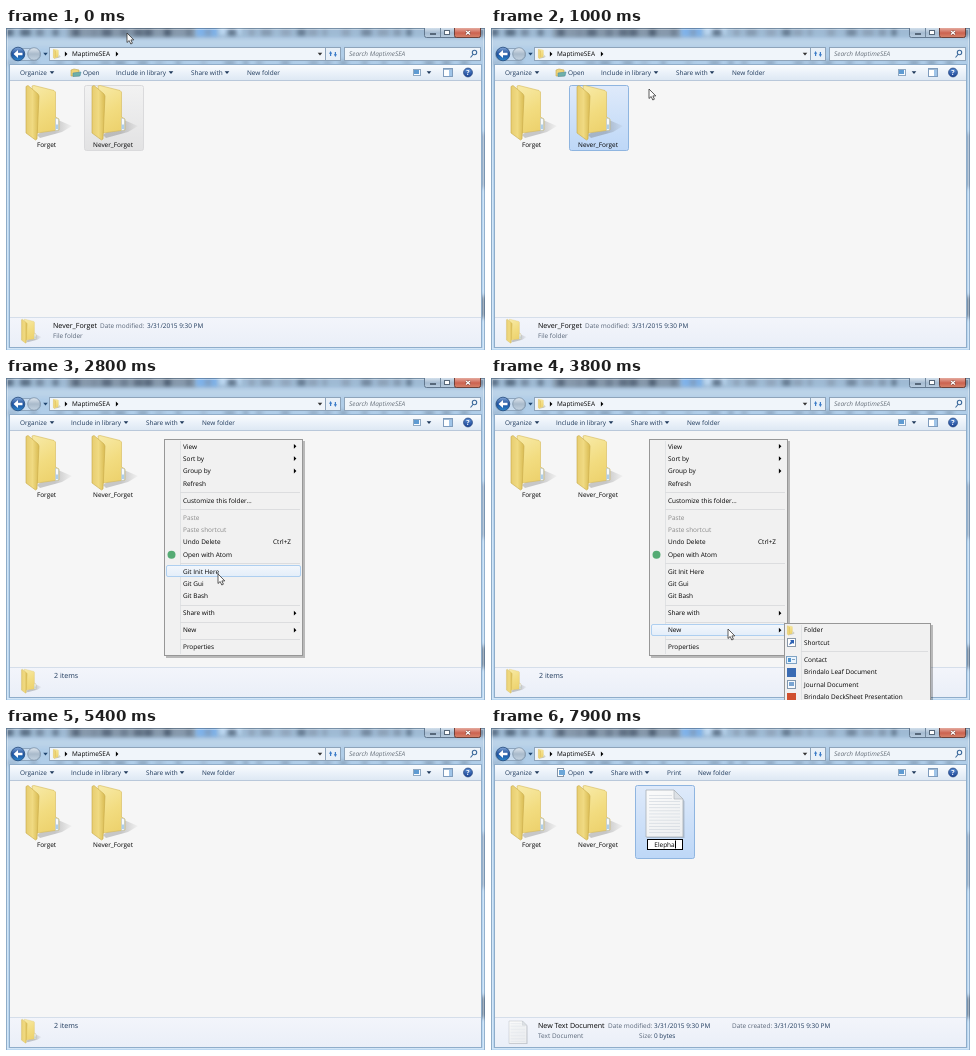
Animation, 479 px wide and 322 px high, one loop 8000 ms. Source, as an HTML page with a canvas:

```html
<!DOCTYPE html>
<html lang="en">
<head>
<meta charset="utf-8">
<title>Folder window</title>
<style>
html, body { margin: 0; width: 479px; height: 322px; overflow: hidden; }
canvas { display: block; }
</style>
</head>
<body>
<canvas id="stage" width="479" height="322"></canvas>
<script>
const W = 479, H = 322, LOOP = 8000;
const FACE = '"Open Sans", "Noto Sans", sans-serif';
const INK = '#000', NAVY = '#1e395b', DIM = '#5a6779';
const stage = document.getElementById('stage');
let c = stage.getContext('2d');

function fade(x0, y0, x1, y1, ...stops) {
  const g = c.createLinearGradient(x0, y0, x1, y1);
  stops.forEach((s, i) => g.addColorStop(i / (stops.length - 1), s));
  return g;
}
function box(x, y, w, h, fill, line) {
  if (fill) { c.fillStyle = fill; c.fillRect(x, y, w, h); }
  if (line) { c.strokeStyle = line; c.lineWidth = 1; c.strokeRect(x + .5, y + .5, w - 1, h - 1); }
}
function round(x, y, w, h, r, fill, line) {
  c.beginPath();
  c.roundRect(x + .5, y + .5, w - 1, h - 1, r);
  c.fillStyle = fill; c.fill();
  c.lineWidth = 1; c.strokeStyle = line; c.stroke();
}
function poly(pts, fill, line, width = .6) {
  c.beginPath();
  for (let i = 0; i < pts.length; i += 2) c.lineTo(pts[i], pts[i + 1]);
  c.closePath();
  if (fill) { c.fillStyle = fill; c.fill(); }
  if (line) { c.strokeStyle = line; c.lineWidth = width; c.stroke(); }
}
function disc(x, y, r, fill, line) {
  c.beginPath(); c.arc(x, y, r, 0, 7);
  c.fillStyle = fill; c.fill();
  if (line) { c.strokeStyle = line; c.lineWidth = .8; c.stroke(); }
}
function text(s, x, y, color = INK, size = 6.45, align = 'left', style = '') {
  c.font = `${style} ${size}px ${FACE}`;
  c.textAlign = align;
  c.fillStyle = color;
  c.fillText(s, x, y);
}
const down = (x, y, color = NAVY) => poly([x - 2.3, y - 1.2, x + 2.3, y - 1.2, x, y + 1.4], color);
const right = (x, y, color = INK) => poly([x - 1.1, y - 2.4, x + 1.4, y, x - 1.1, y + 2.4], color);

function at(x, y, scale, draw) {
  c.save(); c.translate(x, y); c.scale(scale, scale); draw(); c.restore();
}

// Standing open folder, about 46 by 55 units
function folder(x, y, scale = 1) {
  at(x, y, scale, () => {
    poly([33, 35, 47, 41, 37, 47, 15, 53, 12, 50], fade(14, 0, 47, 0, 'rgba(90,90,90,.3)', 'rgba(90,90,90,.3)', 'rgba(90,90,90,.03)'));
    poly([7, 1, 9, .5, 29, 5.5, 30.5, 7, 30.5, 32, 34, 34, 34, 45, 12, 48], fade(8, 4, 34, 46, '#f7e9a4', '#f2dc80', '#ecd06a'), '#d6b95a');
    poly([30.5, 33, 33.5, 34, 33.5, 45, 30.5, 45.5], '#f8fafc', '#b3bfc9');
    poly([31.4, 39.5, 32.6, 39.5, 32.6, 44, 31.4, 44], '#7eb3df');
    poly([1, 1.5, 3, .5, 13, 9, 14, 11, 12, 54, 10.5, 55, 1, 48], fade(1, 0, 14, 0, '#e7cd70', '#f0da82', '#d9bb52'), '#c8a948');
  });
}

// Ruled sheet with a turned corner, 38 by 47 units
function sheet(x, y, scale = 1) {
  at(x, y, scale, () => {
    poly([1, 1.5, 29, 1.5, 38.5, 11, 38.5, 48, 1, 48], 'rgba(60,70,80,.22)');
    poly([0, 0, 28, 0, 37, 9, 37, 47, 0, 47], fade(0, 0, 37, 47, '#fbfbfb', '#eceef0'), '#a8afb6', .8);
    for (let i = 0; i < 13; i++) box(3, 5 + i * 3.1, i < 2 ? 23 : 31, .7, '#d3d9e0');
    poly([28, 0, 37, 9, 28, 9], '#dde1e6', '#a8afb6');
  });
}

// Blurred desktop seen through the window border
const glass = document.createElement('canvas');
glass.width = W; glass.height = H;
function paintGlass() {
  const main = c;
  c = glass.getContext('2d');
  box(0, 0, W, H, fade(0, 0, 0, H, '#aecbe6', '#b7d5f0', '#bbd8f2'));
  let seed = 11;
  const rnd = () => (seed = seed * 16807 % 2147483647) / 2147483647;
  const blobs = (y, h, gap, alpha) => {
    for (let x = 0; x < W; x += gap * (.6 + rnd() * .8)) {
      const tone = 50 + rnd() * 100;
      box(x, y, 4 + rnd() * 7, h, `rgba(${tone - 15},${tone},${tone + 20},${alpha})`);
    }
  };
  c.filter = 'blur(2px)';
  box(-3, -3, W + 6, 13, '#9fbad4');
  box(62, -3, 128, 13, '#8799ac');
  box(190, -3, 22, 12, '#7fb2ea');
  box(213, -3, 22, 10, '#bcd8f2');
  blobs(1, 7, 17, .6);
  box(0, 11, W, 8, '#bcd3e8');
  blobs(33, 4, 20, .4);
  box(475, 105, 6, 55, '#8ba3bc');
  box(475, 268, 6, 22, '#66788b');
  c.filter = 'none';
  box(0, 0, W, 1, 'rgba(60,80,100,.4)');
  box(0, 0, 1, H, 'rgba(80,110,140,.4)');
  box(W - 1, 0, 1, H, 'rgba(80,110,140,.35)');
  box(1, 1, W - 2, H - 2, null, 'rgba(255,255,255,.35)');
  box(3, 36, 473, 284, null, '#8fadca');
  c = main;
}

function caption() {
  round(418, -3, 57, 13, 2, fade(0, 0, 0, 10, '#d3e0ec', '#a5bbd1', '#bdd0e2'), '#62788f');
  round(448, -3, 27, 13, 2, fade(0, 0, 0, 10, '#e5ab9f', '#cc6250', '#d88a70'), '#6d4038');
  box(434, 0, 1, 9, '#71879d');
  box(424, 5, 6, 2, '#fff', '#57687a');
  box(438, 2, 6, 5, '#fff', '#57687a');
  for (const [color, w] of [['#7a3a30', 2.4], ['#fff', 1.4]]) {
    c.strokeStyle = color; c.lineWidth = w;
    c.beginPath();
    c.moveTo(460, 3); c.lineTo(464, 6.6);
    c.moveTo(464, 3); c.lineTo(460, 6.6);
    c.stroke();
  }
}

function addressBar() {
  round(4, 20, 31, 13, 6, 'rgba(225,236,247,.5)', '#8da5bd');
  disc(12, 26, 6.8, fade(0, 19, 0, 33, '#86a9d8', '#1c4f9c', '#2f8bd0'), '#234a7c');
  poly([7.5, 26, 12, 22, 12, 24.8, 16.5, 24.8, 16.5, 27.2, 12, 27.2, 12, 30], '#fff');
  disc(28, 26, 6.3, fade(0, 19, 0, 33, '#e6edf4', '#a9bacb', '#c6d5e3'), '#7d92a8');
  down(39.5, 26, '#20466f');
  box(43, 19, 277, 14, '#f0f5fa', '#8ea4ba');
  box(319, 19, 16, 14, '#e8f0f8', '#8ea4ba');
  box(338, 19, 137, 14, '#f0f5fa', '#8ea4ba');
  folder(47, 21, .18);
  right(60, 26);
  text('MaptimeSEA', 66, 28.3);
  right(111, 26);
  down(314, 26, '#333');
  poly([323, 25.8, 324.6, 23, 326.2, 25.8, 325.2, 25.8, 325.2, 28, 324, 28, 324, 25.8], '#3c7cc8');
  poly([331, 26.2, 329.4, 29, 327.8, 26.2, 328.8, 26.2, 328.8, 24, 330, 24, 330, 26.2], '#3c7cc8');
  text('Search MaptimeSEA', 343, 28.3, '#69727c', 6.45, 'left', 'italic');
  c.strokeStyle = '#3c6a9c'; c.lineWidth = 1.1;
  c.beginPath(); c.arc(468.5, 24.5, 2.2, 0, 7);
  c.moveTo(467, 26.5); c.lineTo(464.5, 29.5); c.stroke();
}

// Label, its x and, where there is one, the x of its arrow
const BARS = {
  folder: [['Open', 77], ['Include in library', 110, 165], ['Share with', 185, 221], ['New folder', 241]],
  none: [['Include in library', 65, 120], ['Share with', 140, 176], ['New folder', 196]],
  file: [['Open', 77, 100], ['Share with', 120, 156], ['Print', 176], ['New folder', 207]]
};
function toolbar(kind) {
  box(4, 37, 471, 16, fade(0, 37, 0, 53, '#fafcfe', '#eaf1f9', '#dce7f3'));
  box(4, 52, 471, 1, '#b9c8da');
  for (const [label, x, arrow] of [['Organize', 14, 46], ...BARS[kind]]) {
    text(label, x, 46.8, NAVY);
    if (arrow) down(arrow, 44.5);
  }
  if (kind === 'folder') {
    poly([65, 42, 68, 41, 73, 42, 73, 48, 65, 48], '#efd476', '#c3a650');
    poly([67, 45, 75, 44, 74, 48, 67, 48.5], '#6fb0a8', '#4f8fa8');
  } else if (kind === 'file') {
    box(66, 40, 7, 9, '#fff', '#8494a6');
    box(68, 42, 6, 5, '#6ba6d8');
  }
  box(407, 41, 8, 7, '#f8fbff', '#8fa8c2');
  box(408, 42, 5, 4, '#5f9bd2');
  down(423, 44.5);
  box(437, 40, 10, 9, '#fff', '#7f9cbd');
  box(443, 42, 3, 6, '#9fc4e8');
  box(438, 41, 8, 1, '#9fb8d2');
  disc(462, 44.5, 4.4, fade(0, 40, 0, 49, '#5f92d6', '#173f92'), '#1d3f7c');
  text('?', 462, 47.1, '#fff', 7, 'center', 'bold');
}

function details(kind) {
  box(4, 289, 471, 30, fade(0, 289, 0, 319, '#f3f5fb', '#eaeff8'));
  box(4, 289, 471, 1, '#d5deea');
  const when = '3/31/2015 9:30 PM';
  if (kind === 'file') sheet(18, 293, .48);
  else folder(15, 291, .44);
  if (kind === 'none') return text('2 items', 48, 299.8, NAVY, 7.1);
  const file = kind === 'file';
  text(file ? 'New Text Document' : 'Never_Forget', 47, 299.8, INK, 7.1);
  text('Date modified:', file ? 117 : 94, 299.8, DIM);
  text(when, file ? 163 : 141, 299.8, NAVY);
  text(file ? 'Text Document' : 'File folder', 47, 309.8, DIM);
  if (file) {
    text('Date created:', 241, 299.8, DIM);
    text(when, 283, 299.8, NAVY);
    text('Size:', 148, 309.8, DIM);
    text('0 bytes', 163, 309.8, NAVY);
  }
}

const picked = (x, h) => round(x, 57, 60, h, 2, fade(0, 57, 0, 57 + h, '#dfeafa', '#bdd7f7'), '#8fb5e0');

function items(s) {
  box(4, 53, 471, 236, '#f6f6f6');
  if (s.pick === 'idle') round(78, 57, 60, 66, 2, fade(0, 57, 0, 123, '#f2f2f2', '#e2e2e3'), '#dadadc');
  if (s.pick === 'live') picked(78, 66);
  folder(19, 57);
  folder(85, 57);
  text('Forget', 40.5, 119.3, INK, 6.45, 'center');
  text('Never_Forget', 107, 119.3, INK, 6.45, 'center');
  if (s.name === null) return;
  picked(144, 74);
  sheet(155, 62);
  const mid = 173.5;
  c.font = `6.45px ${FACE}`;
  if (s.name === '') {
    box(150, 111, 47, 19, '#fff', INK);
    ['New Text', 'Document'].forEach((word, i) => {
      const w = c.measureText(word).width;
      box(mid - w / 2, 112.5 + i * 8, w, 8, '#3399ff');
      text(word, mid, 118.8 + i * 8, '#fff', 6.45, 'center');
    });
    return;
  }
  const w = c.measureText(s.name).width, bw = Math.round(w + 15.6);
  box(Math.round(mid - bw / 2), 111, bw, 11, '#fff', INK);
  text(s.name, mid, 119.2, INK, 6.45, 'center');
  box(Math.round(mid + w / 2), 112.5, 1, 8, INK);
}

// Centre line, label, extra: '>' opens a submenu, '-' is greyed out
const MENU = [
  [68.3, 'View', '>'], [80.6, 'Sort by', '>'], [93, 'Group by', '>'], [105.3, 'Refresh'],
  [122.3, 'Customize this folder...'], [139.3, 'Paste', '-'], [151.7, 'Paste shortcut', '-'],
  [164, 'Undo Delete', 'Ctrl+Z'], [176.6, 'Open with Atom'], [193.4, 'Git Init Here'],
  [205.7, 'Git Gui'], [218.2, 'Git Bash'], [235.2, 'Share with', '>'], [252.2, 'New', '>'], [269.2, 'Properties']
];
const SUB = [
  [252.2, 'Folder'], [264.7, 'Shortcut'], [282, 'Contact'], [294.2, 'Brindalo Leaf Document'],
  [306.6, 'Journal Document'], [319, 'Brindalo DeckSheet Presentation']
];

function menu(rows, x, y, w, h, gutter, hot) {
  box(x + 2, y + 2, w, h, 'rgba(0,0,0,.25)');
  box(x, y, w, h, '#f1f1f1', '#979797');
  box(x + gutter, y + 2, 1, h - 4, '#e0e2e4');
  rows.forEach(([mid, label, extra], i) => {
    if (i && mid - rows[i - 1][0] > 15) {
      const line = Math.round((mid + rows[i - 1][0]) / 2);
      box(x + gutter, line, w - gutter - 3, 1, '#dcdddf');
    }
    if (hot(mid, label)) round(x + 2, Math.round(mid - 6), w - 4, 12, 1.5, fade(0, mid - 6, 0, mid + 6, '#f3f7fc', '#e2edf9'), '#aecff0');
    text(label, x + gutter + 3, mid + 2.2, extra === '-' ? '#8a8a8a' : INK);
    if (extra === '>') right(x + w - 8, mid);
    else if (extra && extra !== '-') text(extra, x + w - 12, mid + 2.2, INK, 6.45, 'right');
  });
}

function menus(s) {
  const [mx, my] = s.cursor;
  const near = mid => Math.abs(my - mid) < 6.2;
  menu(MENU, 158, 61, 139, 217, 16, (mid, label) => s.sub ? label === 'New' : mx > 160 && near(mid));
  disc(165.5, 176.8, 4, '#55ab74');
  if (!s.sub) return;
  menu(SUB, 293, 245, 147, 90, 17, mid => mx > 296 && near(mid));
  folder(296, 247.5, .18);
  box(296, 260, 9, 9, '#fff', '#8a98a8');
  poly([298, 267, 300, 263, 299, 262, 303, 262, 303, 266, 302, 265], '#2d62b4');
  box(295, 278, 11, 8, '#eaf4fd', '#7fa3c4');
  box(297, 280, 3, 4, '#4f94cf');
  box(301, 281, 3, 1, '#7fa3c4');
  box(296, 290, 9, 9, '#3b6cb3');
  box(296, 302, 9, 9, '#f7fafd', '#8297ad');
  box(298, 304, 5, 4, '#7aa5d2');
  box(296, 315, 9, 9, '#d0502f');
}

function pointer([x, y]) {
  poly([x, y, x, y + 9.5, x + 2.2, y + 7.5, x + 3.8, y + 11, x + 5.4, y + 10.2, x + 3.9, y + 6.9, x + 6.8, y + 6.9], '#fff', '#333', .8);
}

// Time, then pointer position
const PATH = [
  [0, 121, 5], [100, 122, 7], [200, 130, 21], [300, 141, 38], [500, 149, 49], [600, 154, 56],
  [900, 157, 60], [1000, 158, 61], [2500, 163, 76], [2600, 184, 128], [2800, 212, 196],
  [3200, 231, 240], [3400, 237, 251], [3900, 262, 252], [4100, 316, 282], [4300, 330, 400]
];
const KEYS = [6400, 6600, 6800, 7100, 7600, 7900];

function stateAt(t) {
  const step = PATH.filter(p => p[0] <= t).pop();
  return {
    kind: t < 1800 ? 'folder' : t < 6100 ? 'none' : 'file',
    pick: t < 100 ? 'idle' : t < 1600 ? 'live' : '',
    cursor: step.slice(1),
    menu: t >= 2300 && t < 5400,
    sub: t >= 3800,
    name: t < 5600 ? null : 'Elepha'.slice(0, KEYS.filter(k => k <= t).length)
  };
}

function draw(t) {
  const s = stateAt(t);
  c.drawImage(glass, 0, 0);
  caption();
  addressBar();
  toolbar(s.kind);
  items(s);
  details(s.kind);
  if (s.menu) menus(s);
  pointer(s.cursor);
}

c.textRendering = 'geometricPrecision';
paintGlass();
const start = performance.now();
function tick() {
  draw((performance.now() - start) % LOOP);
  requestAnimationFrame(tick);
}
tick();
</script>
</body>
</html>
```
